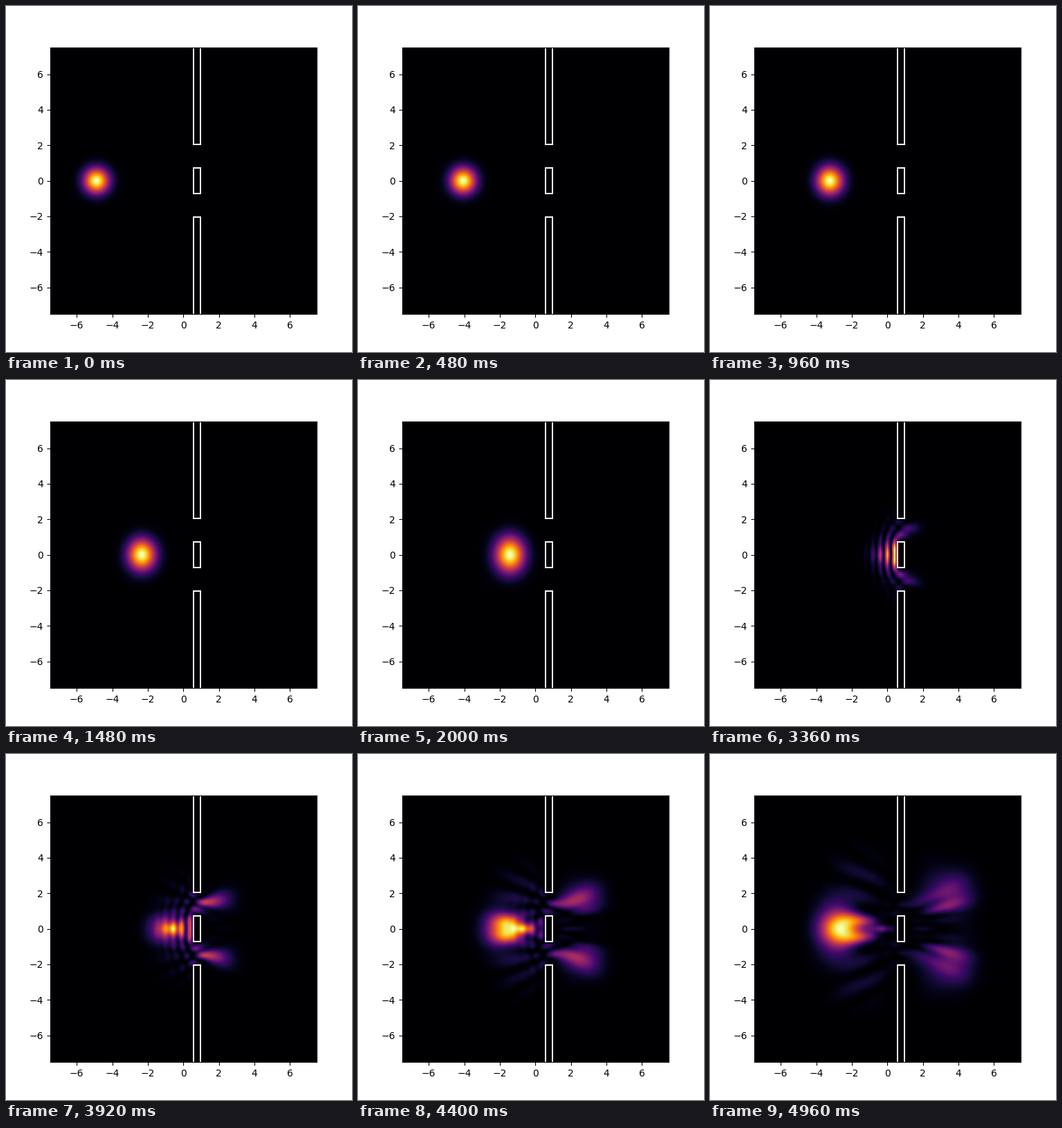
Recreate the animation shown at these times as a matplotlib script. Size 500 px wide and 500 px high, loop 5 s.

```python
"""A quantum wave packet meets a wall with two slits."""
import numpy as np
import matplotlib.pyplot as plt
from matplotlib.animation import FuncAnimation
from matplotlib.patches import Rectangle

FRAMES, INTERVAL = 125, 40
HALF = 7.5                       # half width of the square box
DX, DT = 0.1, 0.01
X0, K0, SIGMA = -5.0, 8.0, 0.5   # packet centre, wave number, width
WALL_L, WALL_R = 0.575, 0.965
SLIT_IN, SLIT_OUT = 0.72, 2.045
SWEEPS = 24

n = int(round(2 * HALF / DX)) + 1
axis = np.linspace(-HALF, HALF, n)
X, Y = np.meshgrid(axis, axis)

solid = (abs(Y) < SLIT_IN) | (abs(Y) > SLIT_OUT)
free = ~((X > WALL_L) & (X < WALL_R) & solid)
free[[0, -1], :] = False
free[:, [0, -1]] = False

r = 1j * DT / (4 * DX**2)


def neighbours(p):
    out = np.zeros_like(p)
    out[1:-1, 1:-1] = p[2:, 1:-1] + p[:-2, 1:-1] + p[1:-1, 2:] + p[1:-1, :-2]
    return out


def step(p):
    """One Crank-Nicolson step, solved by Jacobi sweeps."""
    b = (1 - 4 * r) * p + r * neighbours(p)
    gain = free / (1 + 4 * r)
    for _ in range(SWEEPS):
        p = gain * (b + r * neighbours(p))
    return p


def evolve():
    p = np.exp(-((X - X0)**2 + Y**2) / (4 * SIGMA**2) + 1j * K0 * X) * free
    densities = []
    for _ in range(FRAMES):
        p = step(p)
        d = abs(p)**2
        densities.append(d / d.max())
    return densities


densities = evolve()

fig, ax = plt.subplots(figsize=(5, 5), dpi=100)
image = ax.imshow(densities[0], extent=[-HALF, HALF, -HALF, HALF],
                  origin="lower", cmap="inferno", vmin=0, vmax=1)

for y0, y1 in ((-HALF - 1, -SLIT_OUT), (-SLIT_IN, SLIT_IN), (SLIT_OUT, HALF + 1)):
    ax.add_patch(Rectangle((WALL_L, y0), WALL_R - WALL_L, y1 - y0,
                           fill=False, edgecolor="white", linewidth=1.4))
ax.set_xlim(-HALF, HALF)
ax.set_ylim(-HALF, HALF)


def update(i):
    image.set_data(densities[i])
    return [image]


anim = FuncAnimation(fig, update, frames=FRAMES, interval=INTERVAL,
                     repeat=True, repeat_delay=0)
plt.show()
```
